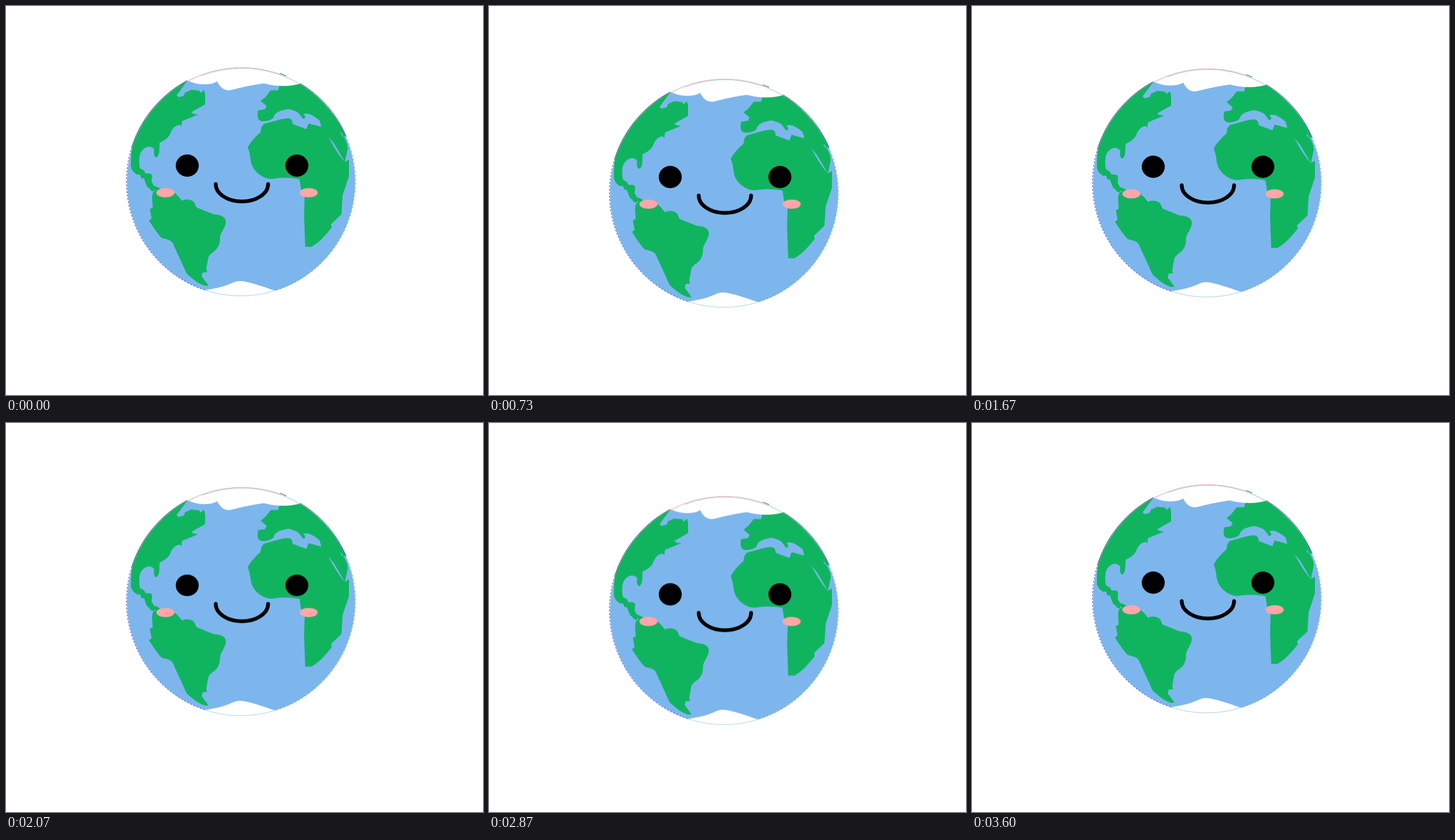
Write an HTML page that moves like this. It is 829x676 px and loops after 3660 ms.

```html
<!DOCTYPE html>
<html lang="en">
<head>
<meta charset="utf-8">
<title>Happy globe</title>
<style>
  html, body { margin: 0; width: 100%; height: 100%; overflow: hidden; background: #fff; }
  svg { display: block; width: 829px; height: 676px; }
  .globe { animation: bob 3660ms cubic-bezier(.27, 0, .73, 1) infinite; }
  .eye { transform-box: fill-box; transform-origin: center; animation: blink 3660ms ease-in-out infinite; }
  .land { fill: #10b45f; }
  .sea { fill: #7db6ed; }
  .line { fill: none; stroke-width: 1; }
  .cheek { fill: #fea6a8; }
  @keyframes bob {
    0%, 49.73%, 98.63%, 100% { transform: translateY(0); }
    25%, 74.18% { transform: translateY(22.6px); }
  }
  @keyframes blink {
    0%, 32.65%, 41.12%, 56.01%, 64.48%, 100% { transform: scaleY(1); }
    36.89%, 60.25% { transform: scaleY(.1); }
  }
</style>
</head>
<body>
<svg viewBox="0 0 829 676">
  <defs>
    <clipPath id="disc"><circle cx="408.5" cy="305.5" r="198.3"/></clipPath>
  </defs>
  <g class="globe">
    <circle class="sea" cx="408.5" cy="305.5" r="198.3"/>
    <g clip-path="url(#disc)">
      <!-- North and Central America -->
      <path class="land" d="M316 129 L296.5 155 L300 158.5 L309 156 L311 150.5 L322 145.500 L336 147 L338 151 L344 146
        L346 153 V171 L322 184.500 L326 187.500 L334 188.500 L306 200 L304.500 209.500 L302 206.500
        C292 208 288 215 285 223 C281 230 275 234 267 237.500 C266 247 268 258 262 263
        C256 262 257 254 257.500 249 C250 240 238 245 233 257 C231 265 231 275 233 282
        C237 285 240 284 242 290.500 C247 292 252 289 254 295 L253 305 L257 312.500 L264 315 L270 319
        L263 323 L259 319 L256 322 L251 320 L249 316 L246 315 L243 309 L240 300 L235 299 L233 293
        L228 293 C221 289 217 284 217 276 L218 245 L205 240 V120 Z"/>
      <!-- South America -->
      <path class="land" d="M256 323 L263 319 L292 324 L298 329 L306 338.500 C312 335 320 336 326 340
        C330 345 329 348 332 350.500 L361 362 C375 363 383 367 382 377 C380 388 373 393 372 402
        C372 414 369 421 361 427 C352 433 352 436 351 440 L348 457 L349.500 462.500 L342 463 L340 469.500
        L352 486 C343 488 330 480 314 465 L292 417 C289 408 286 407 270.500 403
        Q264 397 248.500 373 L253 369 L250 353 L255 350 C255 340 252 333 256 323 Z"/>
      <!-- Europe, Asia and Africa -->
      <path class="land" d="M476 135 L473 146.500 H460 L451 158 L442.500 165 L453 174 L450 179.500 L438 181.500
        C437 190 436 198 444 200 C452 201 460 199 465 194 C467 184 478 181 491 179
        C499 181 507 183 510 188 L516 196 H519 L520 192 L517 188 C525 184 537 192 545 199
        L548 210 L526 204 L522 214 L498 205 C498 194 492 194 477 197 L448 205 L444 210 L442 220
        C432 228 424 238 420 246 C424 254 424 262 426 272 C428 284 444 301 463 300.500
        C480 297.500 497 298 510 301 L513 320 L519 333 L518 364 L520 418.500 H531
        C547 409 556 397 566 385 L565 379 L583 362 L585 329 L596 296 V267 L589 271
        L594 248 L593 240 L587 226 L592 227 L625 226 V100 H490 Z"/>
      <path class="sea" d="M560 227 L570 239 L589 271 Q577 259 560 227 Z M580 220 L584 222 L588 230 Z"/>
      <!-- Ice caps -->
      <path fill="#fff" d="M316 129.500 C330 137 355 139 367 131 C372 142 380 147 388 146.500
        C398 145 410 140 448 134.500 C470 140 492 141 511 135 V90 H316 Z"/>
      <path fill="#fff" d="M343 494.500 C365 491 385 486 397 479.500 C408 475 425 480 470 495.500 V520 H343 Z"/>
    </g>
    <path class="line" stroke="#a9d3e6" d="M345 493.500 A198 198 0 0 0 468 494.500"/>
    <path class="line" stroke="#a9d3e6" d="M340 121 A197 197 0 0 1 510 135.500"/>
    <path class="line" stroke="#e8a0a6" d="M317 130 A198.500 198.500 0 0 1 476 118.500"/>
    <path class="line" stroke="#b8d4dc" d="M476 119 A198 198 0 0 1 510 135"/>
    <path class="line" stroke="#164e58" stroke-width="1.5" d="M476 117 L487 121.500"/>
    <!-- Dark rim along the northern land, broken rim elsewhere -->
    <path class="line" stroke="#123a6e" stroke-width="1.600" d="M315 129.500 A199 199 0 0 0 218.500 245 M511 134.500 A199 199 0 0 1 591 226"/>
    <path class="line" stroke="#2438b8" stroke-dasharray="3 3" d="M218.500 245 A199 199 0 0 0 345 493.500"/>
    <path class="line" stroke="#5a86cc" stroke-dasharray="2 5" d="M591 226 A198.200 198.200 0 0 1 468 494.500"/>
    <ellipse class="cheek" cx="277" cy="324.500" rx="15.700" ry="8"/>
    <ellipse class="cheek" cx="526" cy="324.500" rx="15.700" ry="8"/>
    <ellipse class="eye" cx="315" cy="277.400" rx="20" ry="19.300"/>
    <ellipse class="eye" cx="505.500" cy="277.400" rx="20" ry="19.300"/>
    <path fill="none" stroke="#000" stroke-width="6.500" stroke-linecap="round"
      d="M364.500 309.500 A45.500 30.200 0 0 0 455.500 309.500"/>
  </g>
</svg>
</body>
</html>
```
